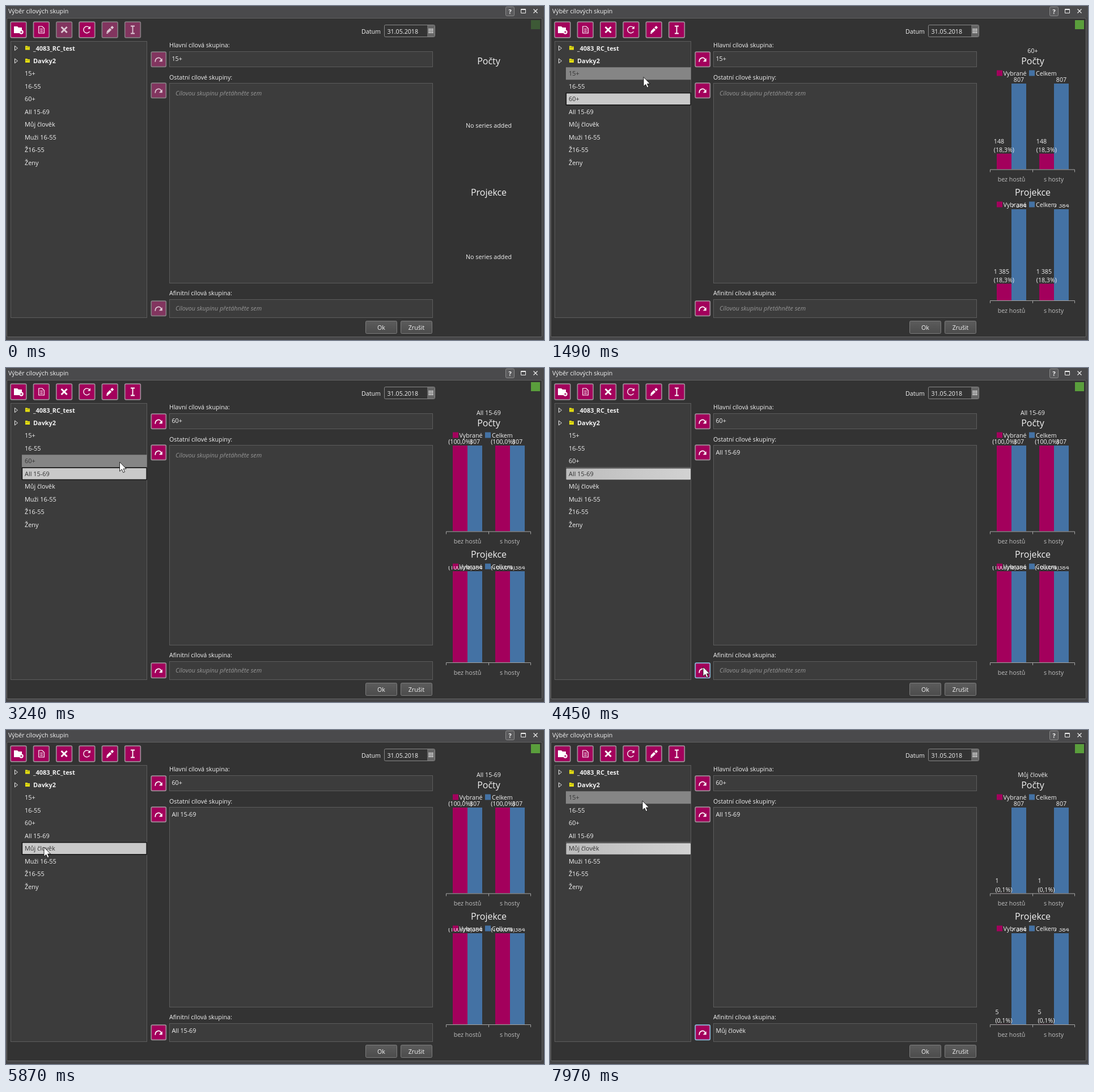
Animation of 949 by 590 pixels, one loop 8000 ms. Source, as an HTML page:

```html
<!DOCTYPE html>
<html lang="cs">
<head>
<meta charset="utf-8">
<title>Výběr cílových skupin</title>
<style>
  html, body { margin: 0; width: 100%; height: 100%; overflow: hidden; background: #454547; }
  svg { display: block; width: 949px; height: 590px; }
  text { font: 10.7px "Open Sans", "Noto Sans", sans-serif; fill: #f2f2f2; white-space: pre; }
  .row { font-size: 10.9px; }
  .bold { font-size: 10.9px; font-weight: 700; }
  .head { font-size: 16px; }
  .mid { text-anchor: middle; }
  .axis { fill: #bdbdbd; }
  .hint { font-size: 10.8px; font-style: italic; fill: #969696; }
  .dark { fill: #333; }
</style>
</head>
<body>
<svg viewBox="0 0 949 590">
  <defs>
    <linearGradient id="picked">
      <stop offset="0" stop-color="#bcbcbc"/><stop offset="1" stop-color="#d2d2d2"/>
    </linearGradient>
    <linearGradient id="push" x2="0" y2="1">
      <stop offset="0" stop-color="#5c5c5c"/><stop offset="1" stop-color="#4c4c4c"/>
    </linearGradient>
    <clipPath id="plot0"><rect x="770" y="124" width="165" height="176"/></clipPath>
    <clipPath id="plot1"><rect x="770" y="350" width="165" height="182"/></clipPath>
  </defs>
  <g id="base"></g>
  <g id="live"></g>
  <path id="cursor" d="M0 0V16.5L3.8 13L6.3 18.7L9 17.5L6.5 12H11.6Z" fill="#fff" stroke="#111" stroke-width=".9"/>
</svg>
<script>
const LOOP = 8000, MAGENTA = '#a3005c', BLUE = '#4472a4';
const $ = id => document.getElementById(id);
const text = (x, y, s, cls = '') => `<text x="${x}" y="${y}" class="${cls}">${s}</text>`;
const rect = (x, y, w, h, fill, extra = '') =>
  `<rect x="${x}" y="${y}" width="${w}" height="${h}" fill="${fill}" ${extra}/>`;
const frame = (x, y, w, h, fill = '#3c3c3c', line = '#5c5c5c', r = 0) =>
  rect(x + .5, y + .5, w - 1, h - 1, fill, `stroke="${line}" rx="${r}"`);
const line = (d, color = '#fff', width = 1) =>
  `<path d="${d}" fill="none" stroke="${color}" stroke-width="${width}"/>`;

const groups = ['15+', '16-55', '60+', 'All 15-69', 'Můj člověk', 'Muži 16-55', 'Ž16-55', 'Ženy'];
const rowTop = i => 108.25 + 22.5 * i;

// Toolbar icons, drawn around their own centre.
const icons = [
  '<path d="M-8-6h6l2 2h6v5h-3v5h-11z" fill="#fff"/><circle cx="5" cy="4" r="3.7" fill="#fff"/>' + line('M3 4h4M5 2v4', MAGENTA),
  line('M-4.5-6h6l3.5 3.5v8.500h-9.500zM-2-1.500h4.500M-2 1h4.500M-2 3.500h4.500', '#fff', 1.2),
  line('M-5-5L5 5M5-5L-5 5', '#fff', 3),
  line('M4.500 3.200A5.800 5.800 0 1 1 3.800-4.200', '#fff', 1.4) + '<path d="M6-6.500v5h-5z" fill="#fff"/>',
  '<path d="M1-4l3-3 3 3-3 3zM0-3l3 3-5 5-4 1 1-4zM-6 6h3v1h-3z" fill="#fff"/>',
  line('M-3.500-6.500h7M-3.500 6.500h7M0-6v12', '#fff', 1.8),
];
const needsRow = [2, 4, 5];

const button = (x, y, size, on, glow, icon) =>
  rect(x - .3, y - .3, size + .6, size + .6, on ? MAGENTA : '#82355f',
    `rx="2" stroke="${glow ? '#8fb9dc' : on ? '#a08c98' : '#857d82'}" stroke-width="1.7"`) +
  `<g transform="translate(${x + size / 2} ${y + size / 2})" opacity="${on ? 1 : .72}">${icon}</g>`;

const arrowIcon = line('M-6 4.500C-6-4 3-5 4.500 1', '#fff', 1.7) + '<path d="M6.500-2v6h-6z" fill="#fff"/>';
const arrowTops = [81.5, 136.5, 521.5];

function drawBase() {
  const bar = rect(0, 0, 949, 590, '#454547') + rect(0, 0, 949, 20, '#4a4a4c') +
    frame(1, 21, 945, 564, '#333', '#666', 2) + text(4, 13, 'Výběr cílových skupin') +
    frame(881, 1, 16, 17, '#5b5b5d', '#8a8a8a', 2) + text(889, 13.5, '?', 'bold mid') +
    line('M908.500 5.500h8v7h-8zM908 6.500h9', '#eee') + line('M930.500 5.500l7 7M937.500 5.500l-7 7', '#eee', 1.2);
  const date = text(627, 49, 'Datum') + frame(667, 33, 90, 22, '#333', '#8a8a8a', 2) +
    rect(743, 34, 13, 20, '#666') + text(672.5, 49, '31.05.2018') +
    [0, 1, 2].map(r => [0, 1, 2].map(c => rect(745.5 + 3 * c, 40 + 3 * r, 2, 2, '#eee')).join('')).join('');
  const tree = frame(8, 62, 241, 489) + ['_4083_RC_test', 'Davky2'].map((name, i) => {
    const y = 74.5 + 22.5 * i;
    return line(`M15.500 ${y - 4}l5 4-5 4z`, '#e8e8e8') +
      rect(34, y - 3, 8, 6, '#e6df10') + rect(34, y - 4, 4, 2, '#e6df10') + rect(35, y - 1.5, 6, 1, '#a59f20') +
      text(48, y + 4, name, 'bold');
  }).join('');
  const fields = [[80, 28, 'Hlavní cílová skupina:', 73], [136, 354, 'Ostatní cílové skupiny:', 129.5],
    [518, 33, 'Afinitní cílová skupina:', 511]]
    .map(([y, h, label, base]) => frame(288, y, 465, h) + text(288, base, label)).join('');
  const actions = [[634, 'Ok'], [696, 'Zrušit']].map(([x, s]) =>
    frame(x, 556, 56, 23, 'url(#push)', '#7c7c7c', 2) + text(x + 28, 572, s, 'mid')).join('');
  $('base').innerHTML = bar + date + tree + fields + actions +
    text(851.5, 103, 'Počty', 'head mid') + text(851.5, 334.5, 'Projekce', 'head mid');
}

const stats = {
  '60+': { share: .183, pct: '18,3%', values: ['148', '1 385'] },
  'All 15-69': { share: 1, pct: '100,0%', values: ['807', '7 384'] },
  'Můj člověk': { share: .001, pct: '0,1%', values: ['1', '5'] },
};

function chart(index, { share, pct, values }) {
  const [floor, height, legend, total] = index ? [520, 161, 350.5, '7 384'] : [288.5, 151.5, 118.5, '807'];
  const top = floor - height * share, label = `(${pct})`;
  const left = 801 - (pct.length + 2) * 2.6;
  const bars = [788, 863].map((x, i) => {
    const shift = 75 * i;
    return rect(x, top, 26, floor - top, MAGENTA) + rect(x + 26, floor - height, 26, height, BLUE) +
      text(left + shift, top - 18, values[index]) + text(left + shift, top - 2.8, label) +
      text(827 + shift, floor - height - 3, total, 'mid');
  }).join('');
  return rect(788, legend - 5, 10, 10, MAGENTA) + text(799.5, legend + 4, 'Vybrané') +
    rect(845, legend - 5, 10, 10, BLUE) + text(857, legend + 4, 'Celkem') +
    `<g clip-path="url(#plot${index})">${bars}</g>` +
    line(`M776.500 ${floor + 5}v-4.500h149v4.500M851.500 ${floor + .5}v4.500`, '#a5a5a5') +
    text(814, floor + 21.5, 'bez hostů', 'axis mid') + text(888.5, floor + 21.5, 's hosty', 'axis mid');
}

// Value of the last entry [time, value] already reached.
const at = (t, list) => list.reduce((v, [time, next]) => t >= time ? next : v, null);
const picks = [[940, 2], [2900, 3], [5870, 4]];
const rowFocus = [[940, 1], [2050, 0], [2900, 1], [3680, 0], [5870, 1], [6880, 0]];
const arrowFocus = [[2050, 0], [2900, null], [3680, 1], [4450, 2], [5870, null], [6880, 2]];
const charts = [[1150, '60+'], [2900, 'All 15-69'], [6080, 'Můj člověk']];
const mains = [[0, '15+'], [2050, '60+']];
const others = [[3800, 'All 15-69']];
const affinities = [[4570, 'All 15-69'], [6880, 'Můj člověk']];

// Pointer moves: start, time of last step, steps, target.
const moves = [
  [180, 940, 8, 60, 161], [1150, 1930, 8, 270, 90], [2050, 2350, 4, 142, 173],
  [2590, 2680, 2, 131, 185], [2900, 3680, 8, 270, 147], [3800, 4450, 7, 270, 528],
  [4660, 5220, 6, 67, 207], [6080, 6880, 8, 262, 531], [6980, 7100, 2, 247, 530],
  [7320, 7970, 7, 163, 125],
];
function pointer(t) {
  let x = 449, y = 481;
  for (const [start, end, n, tx, ty] of moves) {
    if (t < start) break;
    const step = Math.floor((t - start) / (end - start) * (n - 1) + .01) + 1;
    const p = Math.min(1, step / n), e = p * p * (3 - 2 * p);
    x += (tx - x) * e;
    y += (ty - y) * e;
  }
  return [x, y];
}

function drawRow(name, i, picked, focused, hover) {
  const y = rowTop(i);
  let back = '';
  if (picked && focused) back = rect(28.5, y + .5, 219.5, 21, '#c9c9c9', 'stroke="#0c0c0c" stroke-width="1.3"');
  else if (picked) back = line(`M28 ${y + .2}H248`, '#777') + rect(28.5, y + 1.7, 219.5, 19.8, 'url(#picked)', 'rx="1"');
  else if (hover) back = rect(28, y, 220.5, 22, '#858585');
  return back + text(33, y + 15.2, name, 'row ' + (picked || hover ? 'dark' : ''));
}

const field = (value, y, hintY) => value ? text(292.5, y, value) : text(299, hintY, 'Cílovou skupinu přetáhněte sem', 'hint');

function drawLive(t, x, y) {
  const pick = at(t, picks), shown = at(t, charts), focus = at(t, arrowFocus);
  const enabled = t >= 1150;
  const hoverRow = t >= 180 && x >= 28 && x < 248 ? Math.floor((y - rowTop(0)) / 22.5) : -1;
  return icons.map((icon, i) =>
      button(8.5 + 40.3 * i, 28.5, 27, pick !== null || !needsRow.includes(i), false, icon)).join('') +
    groups.map((name, i) => drawRow(name, i, i === pick, at(t, rowFocus), i === hoverRow)).join('') +
    arrowTops.map((top, i) => {
      const over = x >= 256 && x < 283 && y >= top && y < top + 26;
      return button(256.5, top, 25.5, enabled, enabled && (focus === i || over), arrowIcon);
    }).join('') +
    text(292.5, 97, at(t, mains)) + field(at(t, others), 153, 158) + field(at(t, affinities), 535, 538) +
    rect(926, 25, 16, 16, shown ? '#5a9e3c' : '#3d5936') +
    (shown
      ? text(851.5, 82.5, shown, 'mid') + chart(0, stats[shown]) + chart(1, stats[shown])
      : text(851.5, 215, 'No series added', 'mid') + text(851.5, 446.5, 'No series added', 'mid'));
}

let last = '';
const began = performance.now();
function tick() {
  const t = (performance.now() - began) % LOOP;
  const [x, y] = pointer(t);
  const markup = drawLive(t, x, y);
  if (markup !== last) $('live').innerHTML = last = markup;
  $('cursor').setAttribute('transform', `translate(${x} ${y})`);
  $('cursor').setAttribute('visibility', t < 180 ? 'hidden' : 'visible');
  requestAnimationFrame(tick);
}
drawBase();
tick();
</script>
</body>
</html>
```
